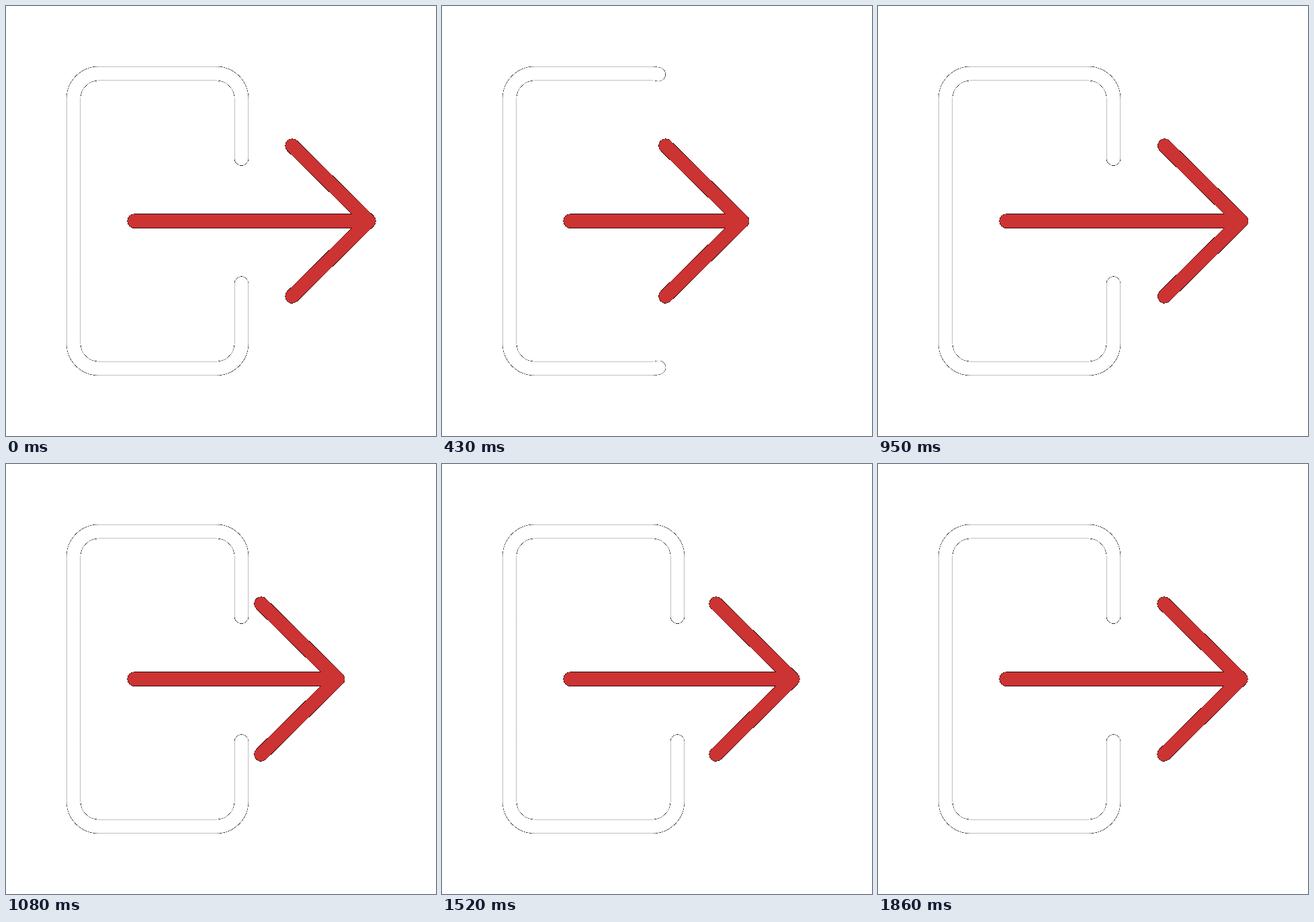
Write an HTML page with a canvas that moves like this. It is 640x640 px and loops after 2610 ms.

```html
<!DOCTYPE html>
<html lang="en">
<head>
<meta charset="utf-8">
<title>Exit icon</title>
<style>
  html, body { margin: 0; width: 100%; height: 100%; overflow: hidden; background: #fff; }
  canvas { display: block; }
</style>
</head>
<body>
<canvas id="stage" width="640" height="640"></canvas>
<script>
const SIZE = 640, LOOP = 2610, STEP = 130 / 3, LAST_STEP = 43;
const ctx = document.getElementById('stage').getContext('2d', { willReadFrequently: true });

// Keys are [step, value], eased in and out between neighbours.
const TIP = [[0, 540], [13.8, 427], [22.3, 541], [27.1, 462], [32.4, 544.5], [37.5, 501], [43, 540]];
const TRIM = [[0, 0], [7.1, 0], [13.8, 350], [19.9, 0], [43, 0]];

const RADIUS = 37.5;
const DOOR_LENGTH = 2 * (89 + 175) + 364 + 2 * Math.PI * RADIUS;

function valueAt(keys, step) {
  const i = Math.max(1, keys.findIndex(key => key[0] >= step));
  const [s0, v0] = keys[i - 1], [s1, v1] = keys[i];
  const x = (step - s0) / (s1 - s0);
  return v0 + (v1 - v0) * (1 - Math.cos(Math.PI * x)) / 2;
}

function drawDoor(trim) {
  const left = 100.5, right = 350.5, top = 100.5, bottom = 539.5;
  ctx.strokeStyle = '#fff';
  ctx.setLineDash([DOOR_LENGTH - 2 * trim, 2 * DOOR_LENGTH]);
  ctx.lineDashOffset = -trim;
  ctx.beginPath();
  ctx.moveTo(right, 227);
  ctx.arcTo(right, top, left, top, RADIUS);
  ctx.arcTo(left, top, left, bottom, RADIUS);
  ctx.arcTo(left, bottom, right, bottom, RADIUS);
  ctx.arcTo(right, bottom, right, 413, RADIUS);
  ctx.lineTo(right, 413);
  ctx.stroke();
}

function drawArrow(tip) {
  ctx.strokeStyle = '#cc3333';
  ctx.setLineDash([]);
  ctx.beginPath();
  ctx.moveTo(191, 320);
  ctx.lineTo(tip, 320);
  ctx.moveTo(tip - 114, 208);
  ctx.lineTo(tip, 320);
  ctx.lineTo(tip - 114, 432);
  ctx.stroke();
}

// Soft edge pixels blend with black, empty ones become white.
function hardenEdges() {
  const image = ctx.getImageData(0, 0, SIZE, SIZE), data = image.data;
  for (let i = 0; i < data.length; i += 4) {
    const alpha = data[i + 3];
    for (let c = i; c < i + 3; c++) data[c] = alpha < 12 ? 255 : data[c] * alpha / 255;
    data[i + 3] = 255;
  }
  ctx.putImageData(image, 0, 0);
}

function draw(step) {
  ctx.clearRect(0, 0, SIZE, SIZE);
  ctx.lineWidth = 20.48;
  ctx.lineCap = ctx.lineJoin = 'round';
  drawDoor(valueAt(TRIM, step));
  drawArrow(valueAt(TIP, step));
  hardenEdges();
}

let shown = -1;
const start = performance.now();

function tick() {
  const time = (performance.now() - start) % LOOP;
  const step = Math.min(LAST_STEP, Math.floor((Math.floor(time / 10) * 10 + 4) / STEP));
  if (step !== shown) draw(shown = step);
  requestAnimationFrame(tick);
}
tick();
</script>
</body>
</html>
```
